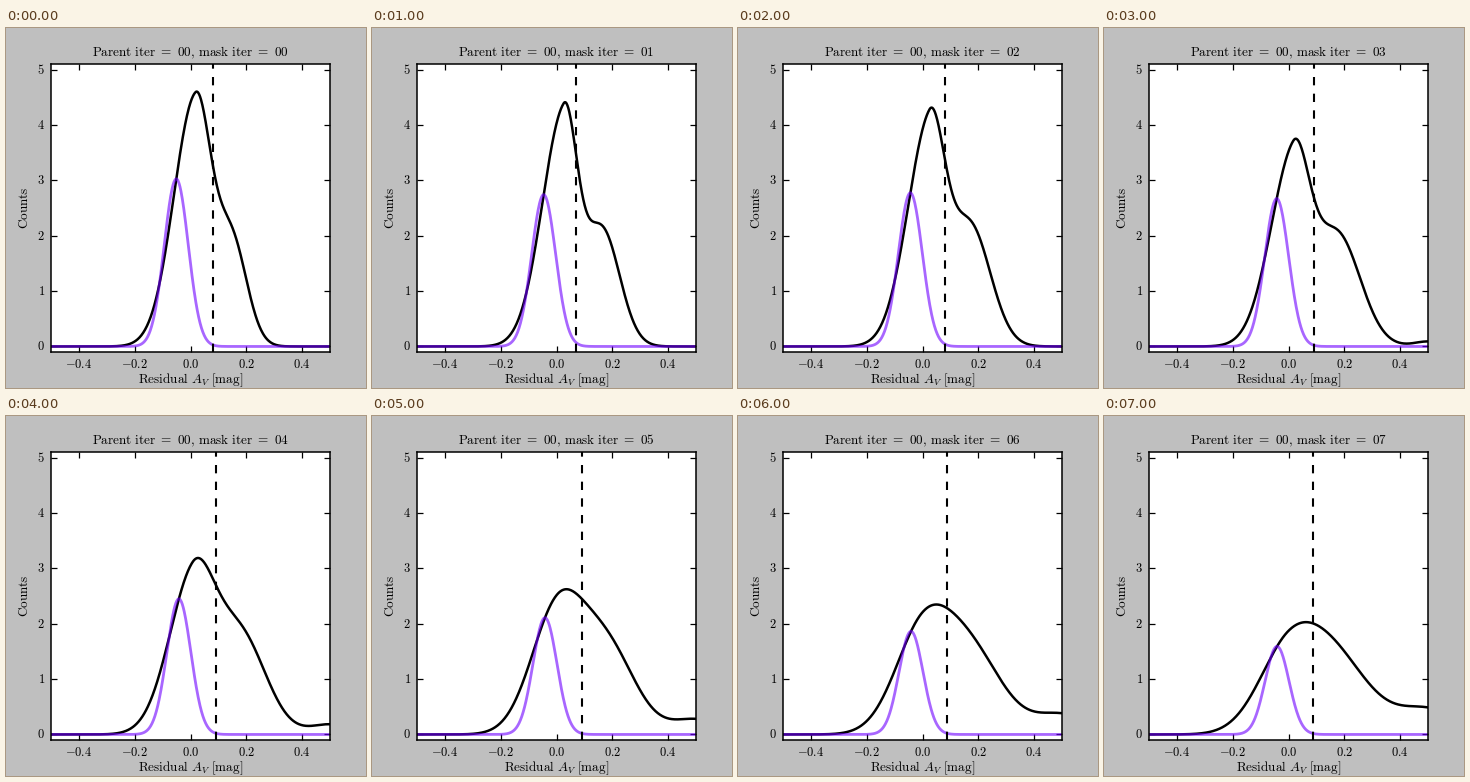
Write a matplotlib script that moves like this. It is 360x360 px and loops after 8000 ms.

```python
import numpy as np
import matplotlib.pyplot as plt
from matplotlib.animation import FuncAnimation

plt.rcParams["mathtext.fontset"] = "cm"

SIZE, DPI = 360, 100
FRAMES, STEP_MS = 8, 1000
LEFT, RIGHT, TOP, BOTTOM = 45, 324, 36, 324
Y_MIN, Y_MAX = -0.1, 5.1

# Key values by iteration; the others are interpolated.
KEYS = (0, 1, 2, 3, 5, 7)
PEAK = (4.47, 4.15, 3.93, 3.33, 2.12, 1.43)
PEAK_X = (.018, .026, .025, .017, 0, 0)
PEAK_RIGHT = (.055, .047, .053, .056, .091, .115)
SHOULDER = (1.9, 2.13, 2.2, 2.05, 1.6, 1.2)
THRESHOLD = (.08, .07, .08, .09, .09, .087)


def key(values, n):
    return np.interp(n, KEYS, values)


def bump(x, height, centre, width):
    return height * np.exp(-((x - centre) / width) ** 2 / 2)


def density(x, n):
    """Skewed main peak, a shoulder that broadens, and a late rise at the right."""
    centre = key(PEAK_X, n)
    width = np.where(x < centre, 0.078 + 0.0006 * n * n, key(PEAK_RIGHT, n))
    y = bump(x, key(PEAK, n), centre, width)
    y += bump(x, key(SHOULDER, n), 0.175 - 0.028 * np.exp(-0.7 * n), 0.055 + 0.0098 * n)
    if n > 2:
        y += bump(x, 0.09 * (n - 2), 0.5, 0.05 * np.sqrt(n - 2))
    return y


def label(x, y, text, size, **kw):
    """Text placed in pixels from the top left corner."""
    kw = {"ha": "center", "va": "baseline", **kw}
    return fig.text(x / SIZE, 1 - y / SIZE, text, fontsize=size, **kw)


def roman(text):
    for plain, tex in ((",", "{,}"), ("=", "{=}"), (" ", r"\ ")):
        text = text.replace(plain, tex)
    return r"$\mathrm{%s}$" % text


fig = plt.figure(figsize=(SIZE / DPI, SIZE / DPI), dpi=DPI, facecolor="0.75")
ax = fig.add_axes([LEFT / SIZE, 1 - BOTTOM / SIZE,
                   (RIGHT - LEFT) / SIZE, (BOTTOM - TOP) / SIZE])
ax.set(xlim=(-0.5, 0.5), ylim=(Y_MIN, Y_MAX),
       xticks=np.arange(-2, 3) / 5, yticks=range(6))
ax.tick_params(direction="in", length=4, width=0.9, top=True, right=True,
               labelbottom=False, labelleft=False)
for side in ax.spines.values():
    side.set_linewidth(1.1)

for v in ax.get_xticks():
    label(LEFT + (v + 0.5) * (RIGHT - LEFT), 340, f"${v:.1f}$", 9)
for v in range(6):
    y = BOTTOM - (v - Y_MIN) / (Y_MAX - Y_MIN) * (BOTTOM - TOP)
    label(39, y + 4, f"${v}$", 9, ha="right")
label(184.5, 355, roman("Residual ") + "$A_V$" + roman(" [mag]"), 9.5)
label(25.5, 180, roman("Counts"), 9.5, rotation=90, va="center", ha="right")
title = label(184.5, 28, "", 9.5)

x = np.linspace(-0.5, 0.5, 600)
black, = ax.plot([], [], color="black", lw=1.8)
bell, = ax.plot([], [], color="#6f00ff", alpha=0.6, lw=2)
mask = ax.axvline(0, color="black", lw=1.5, dashes=(4, 4))


def draw(n):
    centre = -0.041 - 0.01 * 0.5 ** n
    edge = key(THRESHOLD, n)
    black.set_data(x, density(x, n))
    # The bell touches the density at its own centre.
    bell.set_data(x, bump(x, density(centre, n), centre, 0.043))
    mask.set_xdata([edge, edge])
    title.set_text(roman(f"Parent iter = 00, mask iter = {n:02d}"))
    return black, bell, mask, title


anim = FuncAnimation(fig, draw, frames=FRAMES, interval=STEP_MS, repeat=True)
plt.show()
```
